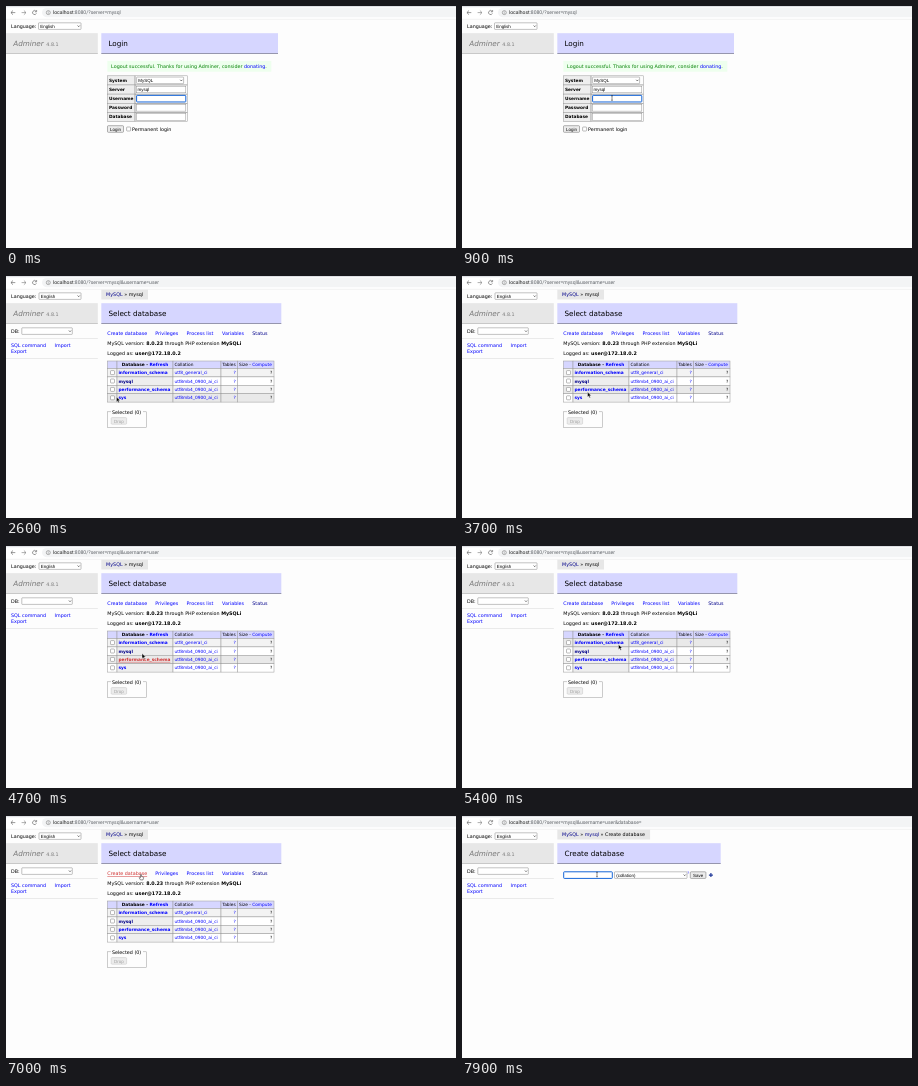
Write an HTML page that moves like this. It is 450 by 242 pixels and loops after 8000 ms.

```html
<!DOCTYPE html>
<html lang="en">
<head>
<meta charset="utf-8">
<title>Adminer</title>
<style>
  html, body { margin: 0; width: 100%; height: 100%; overflow: hidden; background: #fdfdfd; }
  svg { display: block; width: 100vw; height: 100vh; }
  text { font: 4.82px "DejaVu Sans", sans-serif; white-space: pre; text-rendering: geometricPrecision; }
  .cell { font-size: 4.34px; }
  .title { font-size: 7.23px; }
  .italic { font-style: italic; }
  .bold { font-weight: bold; }
  .control { font: 4.46px "Liberation Sans", Arial, sans-serif; }
  .url { font: 5.05px Roboto, sans-serif; }
  .hover { text-decoration: underline; }
</style>
</head>
<body>
<svg id="stage" viewBox="0 0 450 242"></svg>
<script>
const LOOP = 8000, STEP = 100;
const LOGIN_FILLED = 1300, LOGIN_SENT = 2300, LIST_SHOWN = 2500, CREATE_SHOWN = 7200;
const BLUE = '#00f', NAVY = '#00008b', RED = '#d03030', GRAY = '#999', LILAC = '#d6d6ff', SHADE = '#e7e7e7';
const stage = document.getElementById('stage');

// Pointer hot spot: time, x, y
const pointerPath = [
  [100, 419, 38], [900, 150, 92], [1100, 150, 92], [1300, 152, 104], [1500, 150, 106],
  [1800, 110.5, 121], [2700, 110.5, 121], [3300, 122, 117], [4200, 130, 115], [4600, 136, 112],
  [4700, 136, 107.5], [5300, 154, 100.2], [5400, 156.5, 98.5], [6100, 156, 98], [6900, 135, 58.5]
];

const databases = [
  ['information_schema', 'utf8_general_ci', BLUE],
  ['mysql', 'utf8mb4_0900_ai_ci', NAVY],
  ['performance_schema', 'utf8mb4_0900_ai_ci', BLUE],
  ['sys', 'utf8mb4_0900_ai_ci', BLUE]
];

const text = (x, y, s, cls = '', fill = '#000', extra = '') =>
  `<text x="${x}" y="${y}" class="${cls}" fill="${fill}" ${extra}>${s}</text>`;
const span = (s, fill, cls = '') => `<tspan fill="${fill}" class="${cls}">${s}</tspan>`;
const strong = s => span(s, '#000', 'bold');
const rect = (x, y, w, h, fill, stroke = 'none', width = .4, r = 0) =>
  `<rect x="${x}" y="${y}" width="${w}" height="${h}" rx="${r}" fill="${fill}" stroke="${stroke}" stroke-width="${width}"/>`;
const path = (d, stroke = '#555', width = .6, fill = 'none') =>
  `<path d="${d}" stroke="${stroke}" stroke-width="${width}" fill="${fill}"/>`;

const input = (x, y, w, value = '', focused = false, fill = '#fff') =>
  rect(x, y, w, 6.6, fill, focused ? '#1565d8' : '#888', focused ? 1 : .45, focused ? .6 : 0) +
  text(x + 1, y + 4.9, value, 'control');

const select = (x, y, w, value = '') =>
  rect(x, y, w, 6.6, '#fff', '#777', .45, .6) + text(x + 1.7, y + 4.9, value, 'control') +
  path(`M${x + w - 3.4} ${y + 2.7}l1.1 1.2l1.1 -1.2`, '#222', .6);

const button = (x, y, w, label, disabled = false) =>
  rect(x, y, w, 6.6, '#ececec', disabled ? '#c4c4c4' : '#666', .5, .8) +
  text(x + w / 2, y + 4.9, label, 'control', disabled ? '#a0a0a0' : '#000', 'text-anchor="middle"');

const checkbox = (x, y) => rect(x, y, 4, 4, '#fff', '#777', .5, .7);

function pointerAt(t) {
  const next = pointerPath.findIndex(p => p[0] > t);
  if (next < 0) return pointerPath.at(-1).slice(1);
  const [t0, x0, y0] = pointerPath[Math.max(next - 1, 0)], [t1, x1, y1] = pointerPath[next];
  const k = Math.max(0, (t - t0) / (t1 - t0 || 1));
  return [x0 + (x1 - x0) * k, y0 + (y1 - y0) * k];
}

function toolbar(t) {
  const query = t < LIST_SHOWN ? '' : t < CREATE_SHOWN ? '&amp;username=user' : '&amp;username=user&amp;database=';
  return rect(0, 0, 450, 13, '#fff') + rect(0, 0, 450, 1.2, '#dfe1e5') +
    rect(36, 2, 430, 9.2, '#f3f4f5', 'none', 0, 4.6) + rect(0, 12.9, 450, .4, '#ddd') +
    path('M9.3 6.6H5M7 4.5L4.9 6.6L7 8.7') +
    path('M15.6 6.6h4.3M17.9 4.5L20 6.6L17.9 8.7', '#777') +
    path('M30 5.2A2 2 0 1 0 30.4 7.3M30.6 4v1.8h-1.8') +
    '<circle cx="42.3" cy="6.6" r="2" fill="none" stroke="#666" stroke-width=".5"/>' +
    path('M42.3 6.3v1.4M42.3 5.3v.5', '#666', .5) +
    text(47, 8.3, span('localhost', '#222') + `:8080/?server=mysql${query}`, 'url', '#5f6368');
}

function header(title, right) {
  const bar = (x, end, fill, line) => rect(x, 27.2, end - x, 20.8, fill) + rect(x, 47.6, end - x, .4, line);
  return bar(0, 91.8, SHADE, GRAY) + bar(95.3, right, LILAC, '#333') +
    text(7.2, 39.8, 'Adminer', 'title italic', '#777') + text(40.3, 39.8, '4.8.1', '', '#777') +
    text(102.4, 39.8, title, 'title');
}

function sideMenu() {
  const divider = y => rect(0, y, 91.8, .4, '#ccc');
  return text(5, 21.9, 'Language:') + select(33, 16.8, 42, 'English') +
    text(5, 56.7, 'DB:') + select(15.8, 51.8, 50.5) + divider(62.3) +
    text(5, 71.4, 'SQL command', '', BLUE) + text(48.6, 71.4, 'Import', '', BLUE) +
    text(5, 77.4, 'Export', '', BLUE) + divider(82.4);
}

const breadcrumb = (width, trail) => rect(95.3, 13.6, width, 9.9, SHADE) + text(100.1, 20.4, trail);

function loginPage(t) {
  const filled = t >= LOGIN_FILLED, fieldFill = filled && t < LOGIN_SENT ? '#e8f0fe' : '#fff';
  const top = 69.8, pitch = 9.16;
  let out = text(5, 21.9, 'Language:') + select(32.5, 16.8, 42.5, 'English') + header('Login', 272) +
    rect(101.3, 54.8, 164, 10.9, '#efe') +
    text(105.1, 61.8, 'Logout successful. Thanks for using Adminer, consider ' + span('donating', BLUE) + '.', '', '#008000');
  ['System', 'Server', 'Username', 'Password', 'Database'].forEach((label, i) => {
    const y = top + i * pitch;
    out += rect(101.4, y, 27.6, pitch, '#eee', GRAY, .5) + rect(129, y, 52.3, pitch, 'none', GRAY, .5) +
      text(102.9, y + 6, label, 'cell bold');
  });
  const row = i => top + i * pitch + 1.25;
  return out + select(130.6, row(0), 47, 'MySQL') + input(130.6, row(1), 49.2, 'mysql') +
    input(130.6, row(2), 49.2, filled ? 'user' : '', true, fieldFill) +
    input(130.6, row(3), 49.2, filled ? '•••••••' : '', false, fieldFill) + input(130.6, row(4), 49.2) +
    button(101.5, 119.7, 16, 'Login') + checkbox(120.6, 121) + text(126, 124.6, 'Permanent login');
}

function listPage(t) {
  const [hx, hy] = pointerAt(t - STEP);
  const columns = [101.4, 111, 167, 215, 231.5, 268];
  const top = 92.5, pitch = 8.4;
  const row = (y, h, fill) => columns.slice(0, -1).map((x, i) =>
    rect(x, y, columns[i + 1] - x, h, fill(i), GRAY, .5)).join('');
  const onCreate = t > 6800;
  let out = sideMenu() + breadcrumb(46.7, span('MySQL', NAVY) + ' » mysql') + header('Select database', 275.3);
  [[101.3, 'Create database'], [149.2, 'Privileges'], [180.5, 'Process list'], [216, 'Variables'], [246.3, 'Status']]
    .forEach(([x, label], i) => {
      const active = !i && onCreate;
      out += text(x, 59.4, label, active ? 'hover' : '', active ? RED : i === 4 ? NAVY : BLUE);
    });
  out += text(101.3, 69.4, `MySQL version: ${strong('8.0.23')} through PHP extension ${strong('MySQLi')}`) +
    text(101.3, 79.2, `Logged as: ${strong('user@172.18.0.2')}`) +
    row(85, top - 85, () => LILAC) +
    text(139, 90.4, 'Database - ' + span('Refresh', BLUE), 'cell bold', '#000', 'text-anchor="middle"') +
    text(168.4, 90.4, 'Collation', 'cell') + text(216.3, 90.4, 'Tables', 'cell') +
    text(233, 90.4, 'Size - ' + span('Compute', BLUE), 'cell');
  databases.forEach(([name, collation, color], i) => {
    const y = top + i * pitch, base = y + 5.6;
    const rowHover = hy >= y && hy < y + pitch;
    const linkHover = rowHover && hx > 112.3 && hx < 112.3 + name.length * 2.8 && hy > y + 1 && hy < y + 7;
    out += row(y, pitch, c => rowHover ? '#e9e9e9' : c === 1 ? '#eee' : i % 2 ? '#fff' : '#f3f3f3') +
      checkbox(104.5, y + 2.1) +
      text(112.4, base, name, 'cell bold' + (linkHover ? ' hover' : ''), linkHover ? RED : color) +
      text(168.4, base, collation, 'cell', BLUE) +
      text(229.8, base, '?', 'cell', BLUE, 'text-anchor="end"') + text(266.4, base, '?', 'cell', '#000', 'text-anchor="end"');
  });
  return out + rect(101.4, 135.8, 39.2, 15.6, 'none', GRAY, .5) + rect(105, 134, 32, 4, '#fdfdfd') +
    text(106, 137.7, 'Selected (0)') + button(105.2, 141.6, 15.4, 'Drop', true);
}

function createPage() {
  return sideMenu() +
    breadcrumb(92.8, `${span('MySQL', NAVY)} » ${span('mysql', NAVY)} » Create database`) +
    header('Create database', 258.7) + input(101.7, 55.8, 48.6, '', true) +
    select(152.5, 55.8, 72.5, '(collation)') + text(225.2, 58.4, '?', '', BLUE, 'style="font-size:3.4px"') +
    button(228.3, 55.8, 15.6, 'Save') + path('M246.9 59.1h4M248.9 57.1v4', '#223a9a', 1.2);
}

function pointer(t) {
  if (t < 100) return '';
  const [x, y] = pointerAt(t);
  const inField = t >= CREATE_SHOWN || t >= 800 && t < 1100;
  const shape = inField
    ? path('M-.9 -2.4Q0 -2.4 0 -1.8V1.8Q0 2.4 -.9 2.4M.9 -2.4Q0 -2.4 0 -1.8M0 1.8Q0 2.4 .9 2.4', '#111', .5)
    : t >= 6900
      ? path('M-.5 .2Q0 -.5 .5 .2V2L2.3 2.5Q2.8 2.8 2.5 3.7L2 5.4H-.5L-2 3.2Q-1.8 2.5 -.5 3.2Z', '#111', .45, '#fff')
      : path('M0 0V5L1.2 3.9L2 5.8L2.9 5.4L2.1 3.6H3.7Z', '#fff', .4, '#000');
  return `<g transform="translate(${x} ${y})">${shape}</g>`;
}

let shown = -1;
function frame(now) {
  const t = Math.floor(now % LOOP / STEP) * STEP;
  if (t !== shown) {
    const page = t < LIST_SHOWN ? loginPage : t < CREATE_SHOWN ? listPage : createPage;
    stage.innerHTML = rect(0, 0, 450, 242, '#fdfdfd') + toolbar(t) + page(t) + pointer(t);
    shown = t;
  }
  requestAnimationFrame(frame);
}
frame(performance.now());
</script>
</body>
</html>
```
